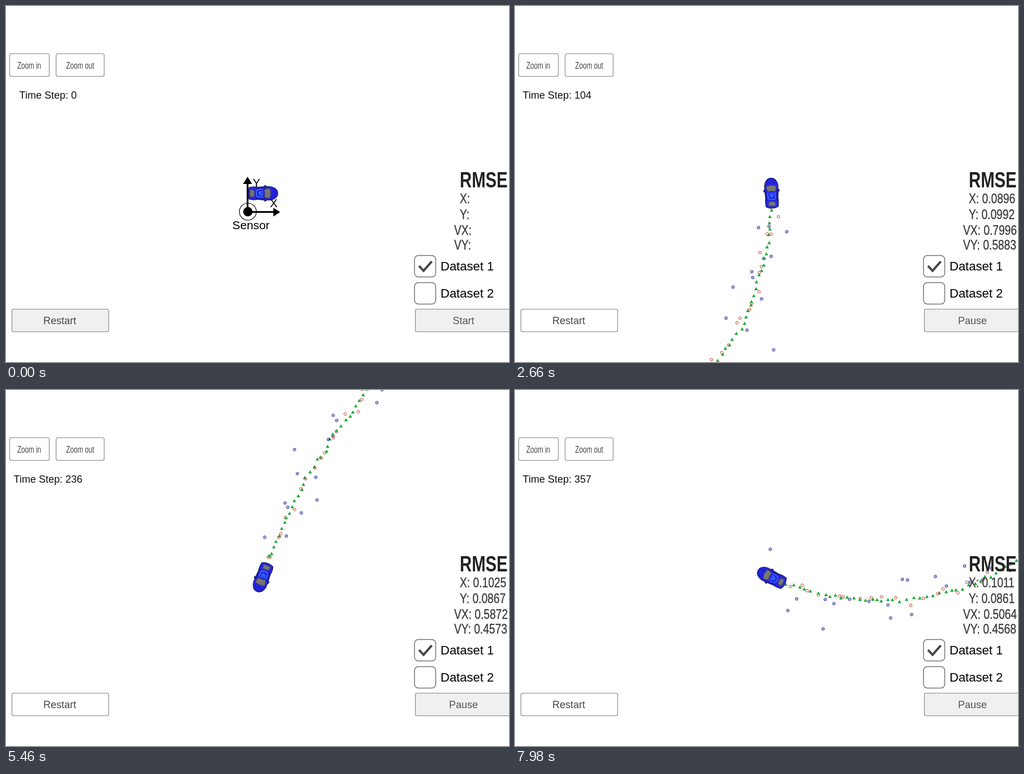
Recreate the animation shown at these times as an HTML page. Size 889 px wide and 630 px high, loop 8000 ms.

```html
<!DOCTYPE html>
<html lang="en">
<head>
<meta charset="utf-8">
<title>Sensor fusion tracker</title>
<style>
  html, body { margin: 0; width: 889px; height: 630px; overflow: hidden; background: #fff; }
  svg { display: block; font-family: "Liberation Sans", Arial, sans-serif; }
  .button { fill: #fff; stroke: #858585; stroke-width: 1.1; }
  .grey { fill: #f0f0f0; }
  .caption { font-size: 18px; fill: #444; text-anchor: middle; }
  .stat { font-size: 24px; fill: #383838; stroke: #383838; stroke-width: .3; }
  .box { fill: #fff; stroke: #757575; stroke-width: 1.5; }
  .estimate { fill: #22a83a; }
  .lidar { fill: none; stroke: #b8402f; stroke-width: 1; }
  .radar { fill: none; stroke: #18188c; stroke-width: 1; }
</style>
</head>
<body>
<svg width="889" height="630" viewBox="0 0 889 630">
  <g id="trail"></g>

  <g id="car" stroke="#14145a" stroke-width="1" stroke-linejoin="round">
    <path d="M5 -11 L3 -14 L6 -13.500 L8 -11 M5 11 L3 14 L6 13.500 L8 11" fill="#1c1cb0"/>
    <path d="M-24 -10.500 Q-17 -12.500 -8 -11 Q4 -12.500 14 -12 Q27 -9.500 27 0 Q27 9.500 14 12 Q4 12.500 -8 11 Q-17 12.500 -24 10.500 Q-29 0 -24 -10.500 Z" fill="#2626ea"/>
    <path d="M15 -8 L24 -5 M15 8 L24 5 M17 -3 L26 -2 M17 3 L26 2" fill="none" stroke="#1717a0"/>
    <path d="M3 -6.500 Q9 -9 12.500 -8.500 Q16 0 12.500 8.500 Q9 9 3 6.500 Q5 0 3 -6.500 Z" fill="#777" stroke="#444"/>
    <path d="M-22 -6.500 L-15 -5.500 Q-14 0 -15 5.500 L-22 6.500 Q-23 0 -22 -6.500 Z" fill="#777" stroke="#444"/>
    <path d="M-13 -8.500 Q-5 -10 6 -9.500 M-13 8.500 Q-5 10 6 9.500" fill="none"/>
    <path d="M1 -6.500 Q-6 -7.500 -10 -5.500 Q-12 0 -10 5.500 Q-6 7.500 1 6.500 M1 -3 Q-5 -4 -6 0 Q-5 4 1 3 M-6 0 H1" fill="none" stroke="#3c8cff" stroke-width="1.200"/>
  </g>

  <g id="sensor">
    <g transform="translate(.5 6)">
      <circle r="15" fill="none" stroke="#000" stroke-width="1.200"/>
      <circle r="8.300"/>
      <path d="M-.5 0 V-50 M0 .5 H48" stroke="#000" stroke-width="3" fill="none"/>
      <path d="M-8.500 -49 L-.5 -62 L7.500 -49 Z M45 -7 L57 .7 L45 8.500 Z"/>
      <text x="8.500" y="-44" font-size="20">Y</text>
      <text x="39" y="-8" font-size="20">X</text>
      <text x="5.500" y="31" font-size="20.800" text-anchor="middle">Sensor</text>
    </g>
  </g>

  <rect class="button" x="6.500" y="84.500" width="70" height="40" rx="3"/>
  <rect class="button" x="88.500" y="84.500" width="85" height="40" rx="3"/>
  <g font-size="16" fill="#444" text-anchor="middle">
    <text transform="translate(41 111) scale(.73 1)">Zoom in</text>
    <text transform="translate(131 111) scale(.73 1)">Zoom out</text>
  </g>
  <text id="clock" x="74.300" y="164" font-size="18" fill="#111" text-anchor="middle"></text>

  <text transform="translate(802 321) scale(.77 1)" font-size="38" font-weight="bold" fill="#222">RMSE</text>
  <g id="stats">
    <text class="stat" transform="translate(802 349) scale(.8 1)"></text>
    <text class="stat" transform="translate(802 376.500) scale(.8 1)"></text>
    <text class="stat" transform="translate(792 405) scale(.8 1)"></text>
    <text class="stat" transform="translate(792 431) scale(.8 1)"></text>
  </g>

  <rect class="box" x="722" y="441.500" width="37.500" height="38" rx="7"/>
  <rect class="box" x="722" y="489.500" width="37.500" height="38" rx="7"/>
  <path d="M730 460 L738 468.500 L752.500 452" fill="none" stroke="#444" stroke-width="4"/>
  <text x="768" y="468" font-size="22">Dataset 1</text>
  <text x="768" y="516" font-size="22">Dataset 2</text>

  <rect id="restart" class="button" x="10.500" y="536.500" width="171" height="40" rx="3"/>
  <text class="caption" x="95" y="563">Restart</text>
  <rect class="button grey" x="723.500" y="536.500" width="171" height="40" rx="3"/>
  <text id="toggle" class="caption" x="808.500" y="563" style="fill:#555"></text>
</svg>
<script>
const LOOP = 8000, TICK = 70, STEPS = 360, SCALE = 44.2, DT = 0.05;
const CENTER = { x: 453.5, y: 331.5 };
const PHASE = 2 * Math.PI / 500;
const START = 420;

// [time in ms, step]
const pace = [[START, 0], [2030, 74], [3290, 133], [4270, 180], [5460, 236], [6860, 303], [7980, 357]];
// [step, x, y, vx, vy]
const errors = [
  [1, 0.2878, 0.0197, 5.1999, 0.0069],
  [10, 0.1320, 0.1260, 2.2140, 1.3150],
  [74, 0.0874, 0.0988, 0.8872, 0.6246],
  [133, 0.0918, 0.0995, 0.7149, 0.5533],
  [180, 0.0898, 0.0920, 0.6331, 0.5077],
  [236, 0.1025, 0.0867, 0.5872, 0.4573],
  [303, 0.0959, 0.0866, 0.5330, 0.4196],
  [357, 0.1011, 0.0861, 0.5064, 0.4568]
];

const el = id => document.getElementById(id);
const [trail, car, sensor, clock, toggle, restart] =
  ["trail", "car", "sensor", "clock", "toggle", "restart"].map(el);
const stats = [...el("stats").children];
const labels = ["X:", "Y:", "VX:", "VY:"];

let seed = 20;
function random() {
  seed = (seed + 0x6D2B79F5) | 0;
  let r = Math.imul(seed ^ seed >>> 15, 1 | seed);
  r = r + Math.imul(r ^ r >>> 7, 61 | r) ^ r;
  return ((r ^ r >>> 14) >>> 0) / 4294967296;
}
const gauss = sigma =>
  sigma * Math.sqrt(-2 * Math.log(1 - random())) * Math.cos(2 * Math.PI * random());

function interpolate(keys, at, column) {
  let k = 1;
  while (k < keys.length - 1 && at > keys[k][0]) k++;
  const a = keys[k - 1], b = keys[k];
  const u = Math.max(0, (at - a[0]) / (b[0] - a[0]));
  return a[column] + (b[column] - a[column]) * u;
}

// Swinging yaw rate and slightly varying speed give the true course.
const yaw = step => 0.55 * DT / PHASE * (1 - Math.cos(PHASE * step));
function buildCourse() {
  const course = [{ x: 0.6, y: 0.6 }];
  for (let i = 0; i < STEPS; i++) {
    const middle = i + 0.5, { x, y } = course[i];
    const length = DT * (5 + 0.2 * Math.cos(2 * PHASE * middle));
    course.push({ x: x + length * Math.cos(yaw(middle)), y: y + length * Math.sin(yaw(middle)) });
  }
  return course;
}

function addMark(group, kind, x, y, d) {
  const mark = document.createElementNS("http://www.w3.org/2000/svg", "path");
  mark.setAttribute("class", kind);
  mark.setAttribute("transform", `translate(${(x * SCALE).toFixed(1)} ${(-y * SCALE).toFixed(1)})`);
  mark.setAttribute("d", d);
  group.append(mark);
}

const RING = "M-2.4 0 A2.4 2.4 0 1 1 2.4 0 A2.4 2.4 0 1 1 -2.4 0";
function buildTrail(course) {
  let driftX = -0.28, driftY = -0.02;
  return course.map(({ x, y }, i) => {
    const group = document.createElementNS("http://www.w3.org/2000/svg", "g");
    if (i % 2) {
      const range = Math.hypot(x, y) + gauss(0.3);
      const bearing = Math.atan2(y, x) + gauss(0.03);
      addMark(group, "radar", range * Math.cos(bearing), range * Math.sin(bearing), RING + " M-1.2 .8 L1.2 -.8");
    } else {
      const first = i === 0;
      addMark(group, "lidar", x + (first ? driftX : gauss(0.15)), y + (first ? driftY : gauss(0.15)), RING);
    }
    addMark(group, "estimate", x + driftX, y + driftY, "M-3.2 2.7 L0 -3 L3.2 2.7 Z");
    driftX = driftX * 0.7 + gauss(0.045);
    driftY = driftY * 0.7 + gauss(0.045);
    trail.append(group);
    return group;
  });
}

const course = buildCourse();
const marks = buildTrail(course);

function render(time) {
  const t = Math.floor(time / TICK) * TICK;
  const running = t >= START;
  const step = running ? Math.max(1, Math.round(interpolate(pace, t, 1))) : 0;
  const { x, y } = course[step];
  const view = `translate(${CENTER.x - x * SCALE} ${CENTER.y + y * SCALE})`;

  trail.setAttribute("transform", view);
  sensor.setAttribute("transform", view);
  car.setAttribute("transform",
    `translate(${CENTER.x} ${CENTER.y}) rotate(${-yaw(step) * 180 / Math.PI})`);
  marks.forEach((mark, i) => mark.setAttribute("display", running && i <= step ? "inline" : "none"));

  clock.textContent = `Time Step: ${step}`;
  toggle.textContent = running ? "Pause" : "Start";
  restart.classList.toggle("grey", !running);
  stats.forEach((stat, i) => {
    stat.textContent = labels[i] + (running ? " " + interpolate(errors, step, i + 1).toFixed(4) : "");
  });
}

const begin = performance.now();
function loop() {
  render((performance.now() - begin) % LOOP);
  requestAnimationFrame(loop);
}
loop();
</script>
</body>
</html>
```
